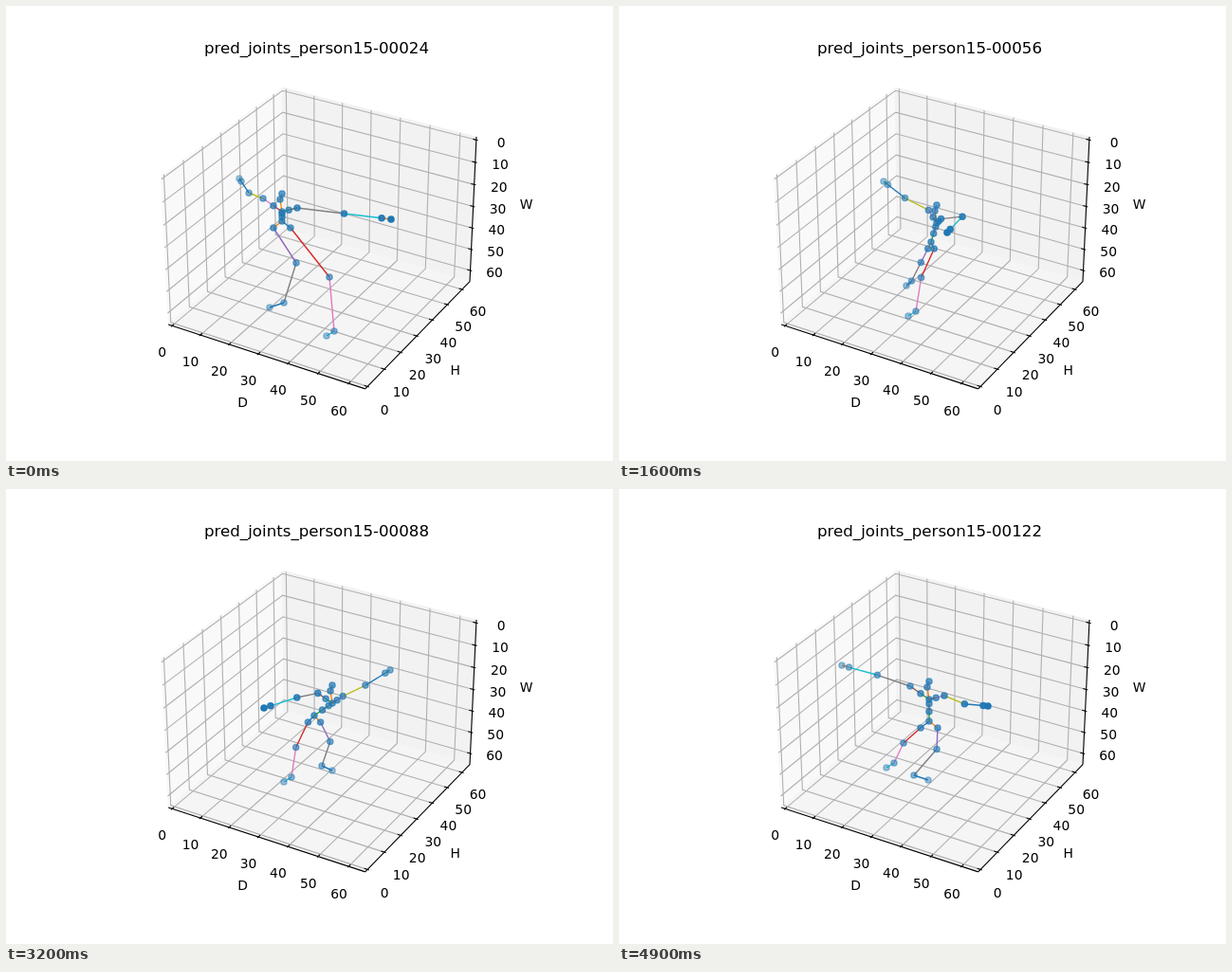
An HTML page with a canvas for the animation above (5 s loop, 640 by 480 pixels).

```html
<!DOCTYPE html>
<html lang="en">
<head>
<meta charset="utf-8">
<title>Joint plot</title>
<style>
  html, body { margin: 0; width: 100%; height: 100%; overflow: hidden; background: #fff; }
  canvas { display: block; }
</style>
</head>
<body>
<canvas id="stage" width="640" height="480"></canvas>
<script>
const ctx = document.getElementById('stage').getContext('2d');
const LOOP = 5000, STEP = 100;
const MID = 32, UNIT = 64 / 12;                       // axis centre, layout unit
const LO = -UNIT / 4, HI = 64 + UNIT / 4;             // padded axis limits
const TICKS = [0, 10, 20, 30, 40, 50, 60];
const FONT = '"DejaVu Sans", sans-serif';
const CYCLE = ['#1f77b4', '#ff7f0e', '#2ca02c', '#d62728', '#9467bd',
               '#8c564b', '#e377c2', '#7f7f7f', '#bcbd22', '#17becf'];

// Paths of the points that lead the body; all other joints follow from them.
const TIMES = [0, 600, 1600, 2500, 3200, 4200, 4900];
const LEAD = {
  pelvis: [[291, 227], [313, 239], [329, 249], [341, 251], [325, 239], [289, 239], [327, 245]],
  chest:  [[291, 217], [310, 223], [335, 229], [341, 231], [344, 226], [292, 218], [327, 222]],
  handL:  [[406, 225], [371, 214], [346, 239], [290, 249], [272, 231], [198, 209], [235, 186]],
  handR:  [[246, 182], [251, 176], [279, 185], [368, 182], [405, 191], [372, 218], [389, 229]],
  footL:  [[338, 348], [314, 306], [305, 327], [319, 325], [293, 309], [286, 300], [282, 294]],
  footR:  [[278, 318], [257, 301], [303, 295], [347, 297], [344, 297], [335, 296], [326, 307]],
};

const clamp = (v, lo, hi) => Math.min(hi, Math.max(lo, v));
const shift = ([x, y], dx, dy) => [x + dx, y + dy];
const mix = (p, q, f) => [p[0] + (q[0] - p[0]) * f, p[1] + (q[1] - p[1]) * f];

// Smooth curve through four neighbouring points, from b to c.
function spline(a, b, c, d, u) {
  return b + u / 2 * (c - a + u * (2 * a - 5 * b + 4 * c - d + u * (3 * (b - c) + d - a)));
}

function body(t) {
  let i = 0;
  while (i < TIMES.length - 2 && TIMES[i + 1] <= t) i++;
  const u = (t - TIMES[i]) / (TIMES[i + 1] - TIMES[i]);
  const at = name => {
    const [a, b, c, d] = [-1, 0, 1, 2].map(k => LEAD[name][clamp(i + k, 0, TIMES.length - 1)]);
    return [0, 1].map(k => spline(a[k], b[k], c[k], d[k], u));
  };
  const turn = Math.PI * Math.min(1, t / 4200);       // the body makes half a turn
  const side = Math.cos(turn), front = Math.sin(turn);
  const swing = i < 2 ? 4 * u * (1 - u) : 0;          // arms fly out twice at the start
  const lunge = 22 * Math.max(0, 1 - t / 500);

  const pelvis = at('pelvis'), chest = at('chest');
  const neck = shift(chest, -2, -13), head = shift(chest, 0, -19);

  function arm(sign, hand, bendX, bendY) {
    const shoulder = shift(chest, -2 + sign * 18 * side, -9 + sign * (5 * side + 3 * front));
    const collar = mix(chest, shoulder, .45);
    const slack = Math.max(0, 80 - Math.hypot(hand[0] - shoulder[0], hand[1] - shoulder[1]));
    const elbow = shift(mix(shoulder, hand, .5), slack * bendX, slack * bendY);
    return [collar, shoulder, elbow, mix(elbow, hand, .8), hand];
  }
  function leg(sign, foot, toe) {
    const hip = shift(pelvis, sign * 9 * side, 7);
    const knee = shift(mix(hip, foot, .5), lunge + 2 - sign * 2, -5);
    return [hip, knee, shift(foot, toe, -5), foot];
  }
  return {
    spine: [pelvis, mix(pelvis, chest, .45), mix(pelvis, chest, .8), chest, neck, head],
    legL: leg(1, at('footL'), 8),
    legR: leg(-1, at('footR'), 15 * side),
    armL: arm(1, shift(at('handL'), 75 * swing, 0), .3, -.15),
    armR: arm(-1, shift(at('handR'), -38 * swing, 0), -.05, .1),
  };
}

// Perspective view: elevation 30°, azimuth -60°, z pointing down.
function project([x, y, z]) {
  const a = (x - MID) / 56, b = (y - MID) / 56, c = (MID - z) * .75 / 56;
  const scale = 1997.8 / (10 - .433 * a + .75 * b - .5 * c);
  return [333 + scale * (.866 * a + .5 * b), 237.4 - scale * (-.25 * a + .433 * b + .866 * c)];
}

function path(points, color, width, fill) {
  ctx.beginPath();
  points.forEach(p => ctx.lineTo(...p));
  if (fill) { ctx.closePath(); ctx.fillStyle = color; ctx.fill(); }
  ctx.strokeStyle = color;
  ctx.lineWidth = width;
  ctx.stroke();
}
const line3 = (points, color, fill) => path(points.map(project), color, 1.11, fill);

function text(str, [x, y], size = 13.89) {
  ctx.font = `${size}px ${FONT}`;
  ctx.fillStyle = '#000';
  ctx.textAlign = 'center';
  ctx.fillText(str, x, y);
}

// place(v, d): point at value v on the axis, moved outwards by d; tickAt: the same for tick ends.
function axis(name, place, tickAt) {
  line3([place(LO, 0), place(HI, 0)], '#000');
  for (const v of TICKS) {
    line3([tickAt(v, -.2 * UNIT), tickAt(v, .1 * UNIT)], '#000');
    text(v, shift(project(place(v, 1.037 * UNIT)), 0, 10.6));
  }
  text(name, shift(project(place(MID, 2.255 * UNIT)), 0, 5));
}

function drawAxes() {
  line3([[LO, LO, HI], [LO, HI, HI], [LO, HI, LO], [LO, LO, LO]], '#f9f9f9', true);
  line3([[LO, HI, HI], [HI, HI, HI], [HI, HI, LO], [LO, HI, LO]], '#f2f2f2', true);
  line3([[LO, LO, HI], [HI, LO, HI], [HI, HI, HI], [LO, HI, HI]], '#f5f5f5', true);
  for (const v of TICKS) {
    line3([[v, LO, HI], [v, HI, HI], [v, HI, LO]], '#b0b0b0');
    line3([[HI, v, HI], [LO, v, HI], [LO, v, LO]], '#b0b0b0');
    line3([[LO, LO, v], [LO, HI, v], [HI, HI, v]], '#b0b0b0');
  }
  axis('D', (v, d) => [v, LO - d, HI + d], (v, d) => [v, LO - d, HI]);
  axis('H', (v, d) => [HI + d, v, HI + d], (v, d) => [HI + d, v, HI]);
  axis('W', (v, d) => [HI + d, HI + d, v], (v, d) => [HI + d, HI, v]);
}

// Each bone takes the next colour of the cycle, starting at `first` and moving on by 3 or 2.
function bones(points, first, step) {
  points.slice(1).forEach((p, i) => path([points[i], p], CYCLE[(first + i * step) % 10], 1.39));
}

function dot([x, y], alpha) {
  ctx.globalAlpha = alpha;
  ctx.beginPath();
  ctx.arc(x, y, 3.1, 0, 2 * Math.PI);
  ctx.fill();
  ctx.stroke();
  ctx.globalAlpha = 1;
}

function drawBody(t) {
  const { spine, legL, legR, armL, armR } = body(t);
  const [pelvis, , , chest] = spine;
  bones([pelvis, ...legL], 0, 3);
  bones([pelvis, ...legR], 1, 3);
  bones(spine, 2, 3);
  bones([chest, ...armL.slice(0, 2)], 12, 3);
  bones([chest, ...armR.slice(0, 2)], 13, 3);
  bones(armL.slice(1), 17, 2);
  bones(armR.slice(1), 18, 2);

  ctx.fillStyle = ctx.strokeStyle = CYCLE[0];
  for (const leg of [legL, legR]) leg.forEach((p, i) => dot(p, .7 - .09 * i));
  spine.forEach(p => dot(p, .7));
  // Arms lower on the screen are nearer to the viewer and more solid.
  for (const arm of [armL, armR]) {
    const near = clamp(.45 + (arm[4][1] - 185) / 54, .35, 1);
    arm.forEach((p, i) => dot(p, .7 + (near - .7) * i / 4));
  }
}

function frame(now) {
  const n = Math.floor(now % LOOP / STEP);
  ctx.fillStyle = '#fff';
  ctx.fillRect(0, 0, 640, 480);
  drawAxes();
  drawBody(n * STEP);
  text('pred_joints_person15-' + String(24 + 2 * n).padStart(5, '0'), [327.5, 50], 16.67);
  requestAnimationFrame(frame);
}
requestAnimationFrame(frame);
</script>
</body>
</html>
```
